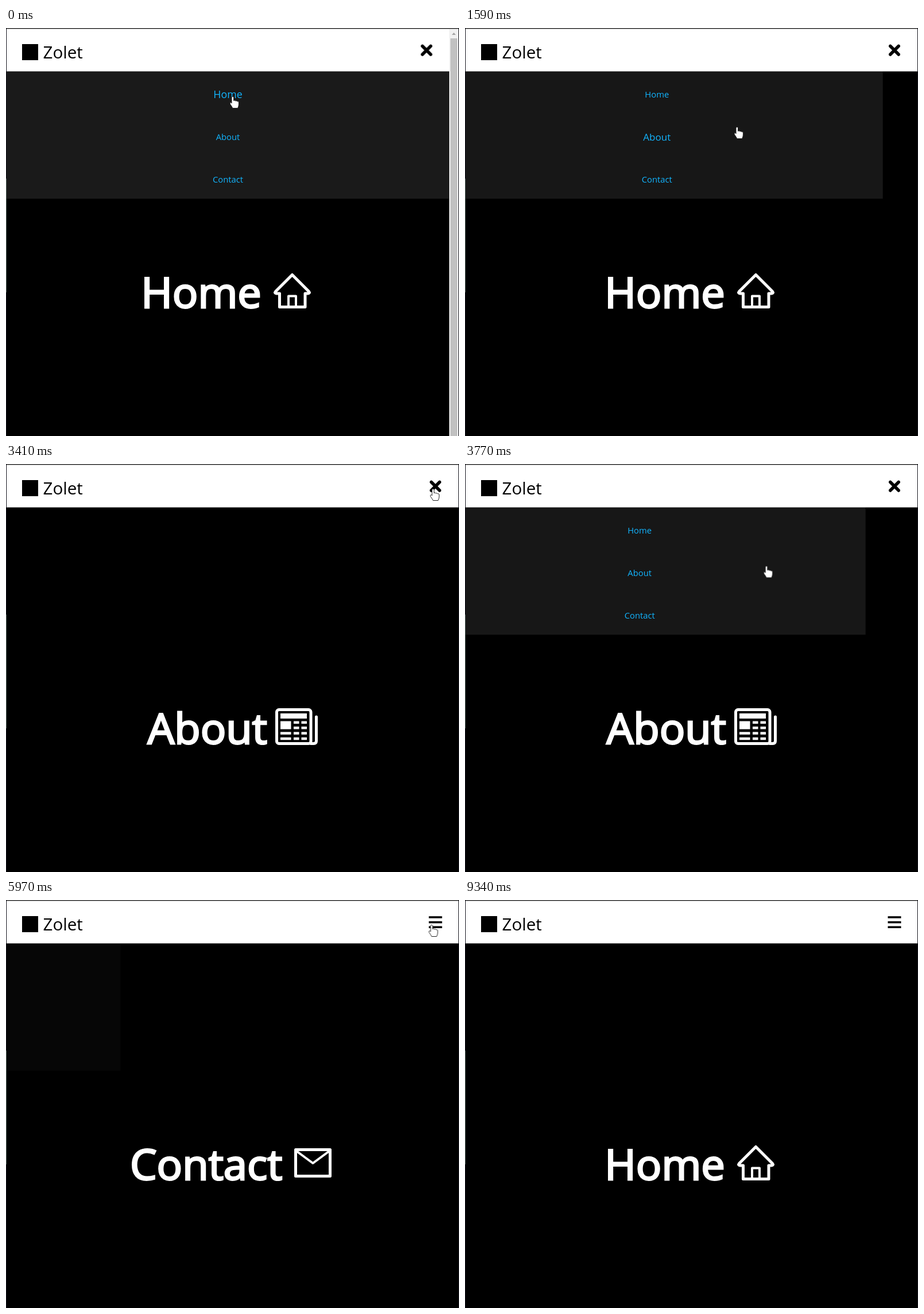
Write an HTML page that moves like this. It is 789 by 710 pixels and loops after 9.36 s.

```html
<!DOCTYPE html>
<html lang="en">
<head>
<meta charset="utf-8">
<title>Menu</title>
<style>
  html, body { margin: 0; width: 100%; height: 100%; overflow: hidden; background: #000; }
  svg { display: block; width: 789px; height: 710px; }
  text { font-family: "Open Sans", "Noto Sans", sans-serif; }
  .brand { font-size: 29.6px; }
  .link { font-size: 14.8px; text-anchor: middle; fill: #12b5ff;
          transform-box: fill-box; transform-origin: center; }
  .title text { font-size: 74px; fill: #fff; stroke: #fff; stroke-width: 3; }
  .line { fill: none; stroke: #fff; stroke-width: 5; stroke-linejoin: round; stroke-linecap: round; }
  .thin { stroke-width: 4; }
  .cursor { fill: #fff; stroke: #222; stroke-width: 1; stroke-linejoin: round; }
</style>
</head>
<body>
<svg viewBox="0 0 789 710">
  <rect width="789" height="710"/>

  <g class="mid">
    <g id="home" class="title">
      <text x="243.2" y="486.5">Home</text>
      <path class="line" d="M484.5 485.5V462H479Q475 461.5 477.5 458.5L506.5 429.5L535.5 458.5Q538 461.5 534 462H529V485.5Z"/>
      <path class="line thin" d="M500 485V466.5H513V485"/>
    </g>
    <g id="about" class="title">
      <text x="246.5" y="486.5">About</text>
      <rect class="line" x="471.5" y="427.5" width="59.5" height="59" rx="4"/>
      <path class="line" d="M540.5 440V482Q540.5 486.5 536 486.5H531"/>
      <path fill="#fff" d="M478 434H524V443H478ZM478 447.5H496.5V461.5H478Z"/>
      <g id="cells" fill="#fff"></g>
    </g>
    <g id="contact" class="title">
      <text x="215.9" y="486.5">Contact</text>
      <rect class="line" x="504.5" y="434.5" width="60" height="46"/>
      <path class="line thin" d="M506 437L534.5 458L563 437"/>
    </g>
  </g>

  <g id="menu">
    <rect id="panel" x="1" y="76" width="787" height="221" fill="#1a1a1a"/>
    <g class="mid">
      <text id="linkHome" class="link" x="394.5" y="121">Home</text>
      <text id="linkAbout" class="link" x="394.5" y="195">About</text>
      <text id="linkContact" class="link" x="394.5" y="269">Contact</text>
    </g>
  </g>

  <rect x="1" y="1" width="787" height="74.5" fill="#fff"/>
  <rect x="28" y="28" width="28" height="28"/>
  <text class="brand" x="64.5" y="53">Zolet</text>
  <g id="icon" stroke="#000">
    <path id="cross" d="M740.8 31.5L755.2 46M755.2 31.5L740.8 46" stroke-width="5.5" stroke-linecap="round"/>
    <path id="burger" d="M736.5 30H759.5M736.5 38.7H759.5M736.5 47.3H759.5" stroke-width="3.5"/>
  </g>

  <g id="bar">
    <rect x="772" y="2" width="16" height="708" fill="#f1f1f1"/>
    <rect x="774" y="18" width="12" height="692" fill="#c1c1c1"/>
    <path d="M776.5 12L780 8L783.5 12Z" fill="#a3a3a3"/>
  </g>

  <rect width="789" height="1.5" fill="#2e2e2e"/>
  <rect width="1" height="710" fill="#14141c"/>
  <rect y="262" width="1" height="198" fill="#5a6a64"/>
  <rect x="788" width="1" height="710" fill="#15151c"/>

  <g id="pointer" class="cursor">
    <path id="hand" d="M-2 12V1.5Q-.2 -1 1.6 1.5V7.5Q3.4 6 4.8 8Q6.6 7 7.8 8.8Q9.8 8 10.4 10V14Q10.4 17 8.6 20.5H-.2Q-1.5 17.5 -4.6 13.5Q-5.6 11 -3.6 10.6Q-2.6 11 -2 12Z"/>
    <path id="arrow" d="M0 0V14.5L3.4 11.4L5.6 16.2L8 15L5.8 10.4H10.2Z"/>
  </g>
</svg>
<script>
const LOOP = 9360;
const STEP = 150, PHASE = 90;   // refresh rhythm of the screen
const SLIDE = 500, GROW = 250;  // transition lengths
const players = [];

// Small cells of the newspaper icon
const cells = document.getElementById('cells');
function cell(x, y, width) {
  const r = document.createElementNS('http://www.w3.org/2000/svg', 'rect');
  Object.entries({ x, y, width, height: 4.5 }).forEach(([k, v]) => r.setAttribute(k, v));
  cells.append(r);
}
for (let row = 0; row < 4; row++) {
  const y = 447.5 + row * 9.4;
  cell(501, y, 9.5);
  cell(514.5, y, 9.5);
  if (row > 1) cell(478, y, 18.5);
}

// keys: [time, value] pairs; the last value holds to the end of the loop
function track(sel, prop, keys, easing = 'linear') {
  const frames = keys.map(([t, v]) => ({ offset: Math.max(0, t) / LOOP, [prop]: v, easing }));
  frames.push({ offset: 1, [prop]: keys[keys.length - 1][1] });
  document.querySelectorAll(sel).forEach(el => {
    const a = el.animate(frames, { duration: LOOP, iterations: Infinity });
    a.pause();
    players.push(a);
  });
}

// Alternates between two values at the given times
const toggle = (sel, prop, times, a, b) =>
  track(sel, prop, [0, ...times].map((t, i) => [t, i % 2 ? b : a]), 'steps(1, end)');
const show = (sel, on, times) => toggle(sel, 'opacity', times, on ? 1 : 0, on ? 0 : 1);

// Pages change on each click
const [toAbout, toContact, toHome] = [2390, 4560, 6835];
show('#home', true, [toAbout, toHome]);
show('#about', false, [toAbout, toContact]);
show('#contact', false, [toContact, toHome]);

// Hovered links grow, and a scrollbar follows that shifts the layout
const hovers = { linkHome: [-GROW, 120], linkAbout: [1400, 2450], linkContact: [3720, toContact] };
for (const [id, [on, off]] of Object.entries(hovers)) {
  const keys = [[0, 1], [on, 1], [on + GROW, 1.2], [off, 1.2], [off + GROW, 1]];
  track('#' + id, 'transform', keys.map(([t, s]) => [t, `scale(${s})`]));
}
const scroll = Object.values(hovers).flatMap(([on, off]) => [on + 450, off + 100]).slice(1);
show('#bar', true, scroll);
toggle('.mid', 'transform', scroll, 'translateX(-8px)', 'translateX(0px)');
toggle('#icon', 'transform', scroll, 'translateX(-15.5px)', 'translateX(0px)');

// Sliding menu: closes and opens in turn
const slides = [680, 1258, 2890, 3390, 5715];
function slide(sel, prop, open, shut) {
  const keys = [[0, open]];
  slides.forEach((t, i) => {
    const [from, to] = i % 2 ? [shut, open] : [open, shut];
    keys.push([t, from], [t + SLIDE, to]);
  });
  track(sel, prop, keys, 'ease');
}
slide('#menu', 'transform', 'translateX(0px)', 'translateX(-787px)');
slide('#panel', 'fillOpacity', 1, 0);
show('#cross', true, slides);
show('#burger', false, slides);

// Pointer stops: arrival, departure, x, y
const stops = [
  [0, 120, 395, 119],
  [750, 1290, 753, 53],
  [1590, 1590, 474, 172],
  [1800, toAbout, 392, 186],
  [2850, 3410, 744, 43],
  [3900, toContact, 392, 259],
  [4740, 4890, 380, 327],
  [5600, 5900, 744, 43],
  [6800, 7300, 80, 41],
  [7870, 7870, 768, 4],
  [8780, 8780, 630, 712]
];
track('#pointer', 'transform', stops.flatMap(([from, to, x, y]) =>
  [from, to].map(t => [t, `translate(${x}px, ${y}px)`])), 'ease-in-out');
const hands = [4650, 5500, 6000, 6800, 7300];
show('#hand', true, hands);
show('#arrow', false, hands);

const start = performance.now();
function draw() {
  const t = Math.max(0, performance.now() - start) % LOOP;
  const now = Math.max(0, t - (t - PHASE + STEP) % STEP);
  players.forEach(p => { p.currentTime = now; });
  requestAnimationFrame(draw);
}
draw();
</script>
</body>
</html>
```
